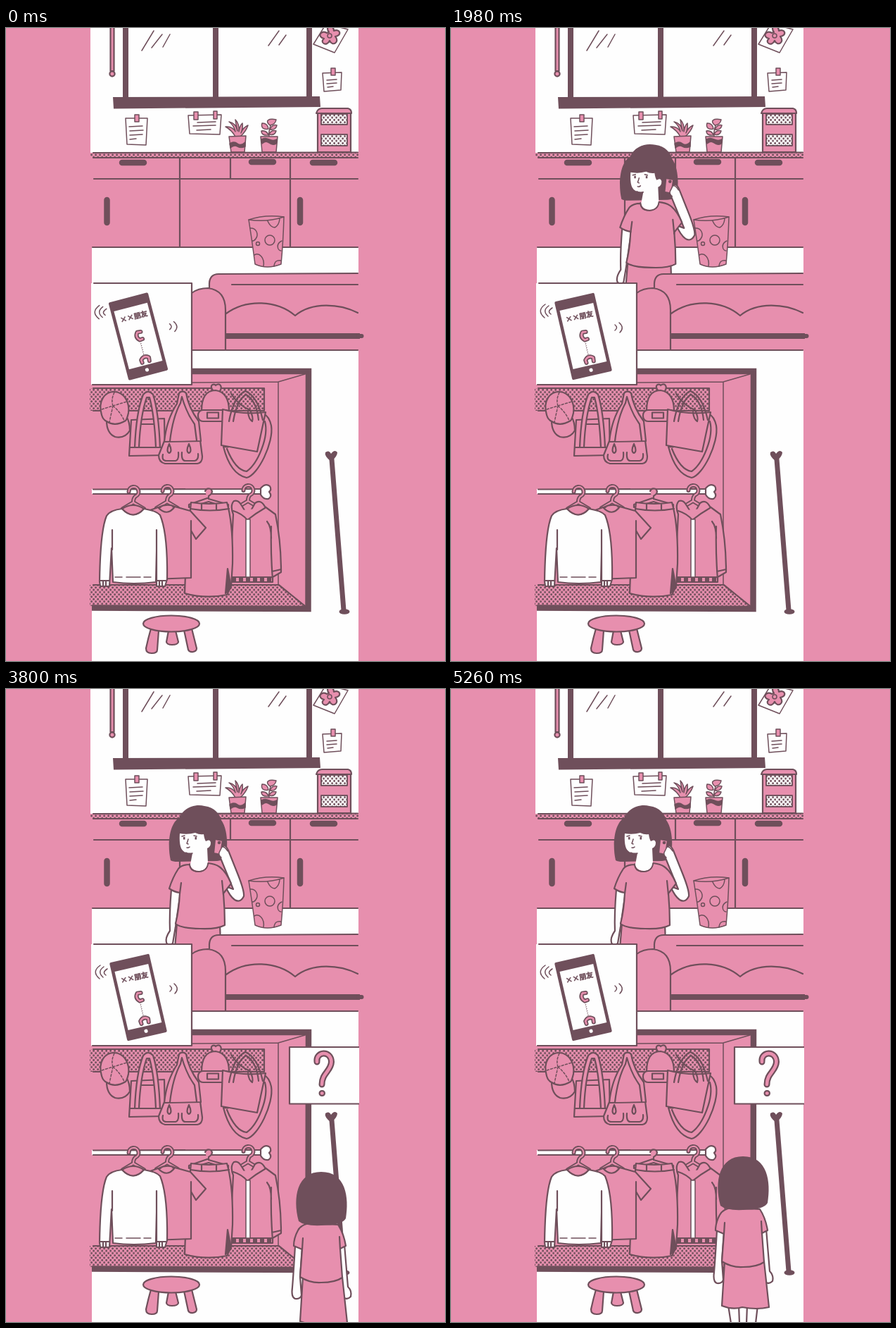
Animation, 624 px wide and 898 px high, one loop 5.36 s. Source, as an HTML page:

```html
<!DOCTYPE html>
<html lang="en">
<head>
<meta charset="utf-8">
<title>Room</title>
<style>
  html, body { margin: 0; height: 100%; overflow: hidden; background: #e78fae; }
  svg { display: block; width: 624px; height: 898px; fill: none; stroke: #6f4f5b; stroke-width: 2.2;
        stroke-linecap: round; stroke-linejoin: round; }
  .p { fill: #e78fae; }
  .w { fill: #fefefe; }
  .d { fill: #6f4f5b; }
  .n { stroke: none; }
  .thin { stroke-width: 1.5; }
  .pink { stroke: #e78fae; }
  text { fill: #6f4f5b; stroke-width: .5; font: bold 10px "Noto Sans CJK SC", "Noto Sans CJK", sans-serif; text-anchor: middle; }
</style>
</head>
<body>
<svg viewBox="0 0 624 898">
  <defs>
    <pattern id="dots" width="6" height="6.6" patternUnits="userSpaceOnUse">
      <g class="d n"><circle cx="1.600" cy="1.700" r="1.500"/><circle cx="4.600" cy="5" r="1.500"/></g>
    </pattern>
    <clipPath id="panel"><rect width="502" height="898"/></clipPath>
    <path id="handset" d="M4-5.500L-1-6Q-6 0 0 5.500L4 5"/>
    <path id="question" d="M442 529C440 514 462 512 462.500 529C462 542 449 545 449 561M449 573.500h.5"/>
    <path id="hook" d="M-6.500-1A7 7 0 1 1 3 5.500Q0 8 0 14L-15 23M0 14L15 23"/>
    <g id="hanger">
      <use href="#hook" stroke-width="6"/>
      <use class="pink" href="#hook" stroke-width="2.200"/>
    </g>
  </defs>

  <rect class="p n" width="624" height="898"/>
  <path class="w n" d="M120 0H501V178H120ZM121 311H501V898H122V311Z"/>

  <!-- window and wall -->
  <path class="d n" d="M166 0h8v98h-8ZM294 0h8v98h-8ZM427 0h8v98h-8ZM152 98L446 97L447 112L153 114.500Z"/>
  <path class="thin" d="M210 4L193 32M222 9L207 28M233 9L223 27M388 4L373 25M398 10L388 24"/>
  <path class="p" d="M148.500-2V61h5V-2"/>
  <circle class="p" cx="151" cy="65" r="3.600"/>
  <path class="w thin" d="M455-6L437 23L467 35L486 2Z"/>
  <path class="p" d="M459 6C452-4 466-6 466 4C475 0 478 11 468 12C475 20 464 27 460 18C456 27 445 21 452 15C442 13 447 2 456 7Z"/>
  <circle class="p thin" cx="460" cy="11" r="3"/>

  <g class="thin">
    <path class="w" d="M450 64L477 63L476 88L452 90Z"/>
    <path d="M456 74L470 73M456 79L470 78M457 84L465 83"/>
    <path class="w" d="M170 128L201 128L199 166L172 165Z"/>
    <path d="M175 140L194 139M176 146L195 145M176 152L194 151M176 158L185 157"/>
    <path class="w" d="M259 124L306 123L304 151L261 150Z"/>
    <path d="M272 134L298 133M266 139L298 138M271 145L291 144"/>
    <path class="p" d="M462 57h6v10h-6ZM183 123h6v10h-6ZM267 119h6v11h-6ZM295 118h5v11h-5Z"/>
  </g>

  <!-- plants and canister -->
  <g class="p thin">
    <path d="M326 154Q321 145 312 140Q322 139 326 147Q324 138 317 133Q327 135 329 146Q327 137 326 130Q332 136 331 147Q332 139 336 135Q337 142 334 149Q337 141 344 138Q341 147 333 154Z"/>
    <path d="M317 154L341 153L339 176H320Z"/>
    <path class="d" d="M318 164Q324 160 329 164T340 162V168Q334 171 329 168T319 170Z"/>
    <path d="M374 154Q373 145 377 136"/>
    <path d="M375 138C367 131 374 128 384 130Q383 137 375 138ZM373 143C366 145 362 141 364 135Q372 135 373 143ZM375 144Q379 136 385 138Q384 145 375 144ZM373 152Q363 153 363 146Q371 145 373 152ZM374 151Q377 144 384 146Q382 153 374 151Z"/>
    <path d="M362 154L386 154L384 176H364Z"/>
    <path class="d" d="M363 158Q368 155 374 158T385 158L384 164Q379 167 374 163T364 164Z"/>
  </g>
  <path class="p" d="M443 121V176H490V121"/>
  <g class="thin">
    <path class="w" d="M448 122H485V137H448ZM448 151H485V167H448Z"/>
    <path fill="url(#dots)" d="M448 122H485V137H448ZM448 151H485V167H448Z"/>
  </g>
  <path class="p" d="M441 121Q443 114 449 114H486Q491 115 491 121Z"/>

  <!-- counter and cabinets -->
  <path class="p n" d="M120 177H501V184H120Z"/>
  <path fill="url(#dots)" stroke="none" d="M120 177H501V184H120Z"/>
  <path d="M124 177L500 176.500M124 184H500M125 214H500M247 184V311M319 184V214M404 184V311M123 311H500"/>
  <path stroke-width="8.500" d="M165 191H196M349 190H380M436 191H467M143.500 244V276M418 244V276"/>

  <!-- basket -->
  <path class="p thin" d="M345 272Q369 264 395 268Q394 304 391 335Q371 343 354 335Q350 303 345 272Z"/>
  <g class="thin">
    <path d="M345 272Q370 276 395 268M347 284C355 283 360 292 355 299Q353 302 350 302M392 302C383 306 386 316 391 316M353 322C360 318 368 326 366 338M381 338Q382 328 391 330M372 274Q376 283 382 283Q388 280 389 271"/>
    <circle cx="375" cy="301" r="7"/><circle cx="358" cy="306" r="2.500"/>
  </g>

  <g id="woman">
    <path class="p" d="M243 332L238 392H306L304 332Z"/>
    <path class="w" d="M235 284Q232 320 233 343Q226 353 228 360Q231 365 237 361L241 337L248 288"/>
    <path class="d n" d="M234 243C229 221 232 191 246 183C253 167 270 163 282 166C297 168 304 178 306 186C315 198 316 225 312 236Q310 243 300 244L244 245Q237 245 234 243Z"/>
    <path class="w" d="M312 280Q318 294 325 299Q333 304 338 294Q339 287 330 264L316 229Q313 222 309 222L303 235L305 240L323 284Z"/>
    <path class="p" d="M261 249Q250 249 245 255Q237 267 232 283Q239 288 247 289Q246 313 241 333Q250 340 276 340Q300 341 311 335Q311 313 309 290L320 276Q313 259 303 252Q297 248 287 247Q286 258 274 259Q262 259 261 249Z"/>
    <path d="M249 275L247 290M307 272Q308 282 309 292"/>
    <path class="w n" d="M247 205Q259 207 269 204Q275 207 281 206Q282 213 284 216Q290 212 291 218Q291 224 286 226L287 247Q285 258 274 258Q263 257 262 249L265 233Q253 234 249 226Q246 219 247 205Z"/>
    <path class="thin" d="M261 248Q262 259 274 259Q286 258 287 247M259 213Q258 217 257 219L259 220M257 225Q259 226 261 224M265 233Q259 234 256 232M250 209L254 208M267 208L271 209"/>
    <path class="d n" d="M252 210h2.500v3.500h-2.500ZM268.500 210h2.500v3.500h-2.500Z"/>
    <path class="p" d="M297 213L308 215L305 235L295 233Z"/>
    <circle class="d n" cx="303" cy="218" r="2.300"/>
    <path class="w thin" d="M315 230Q311 223 307 224L303 232Q302 236 306 239"/>
  </g>

  <!-- sofa -->
  <path class="p n" d="M264 457V376Q270 369 288 369V360Q290 349 302 349H502V457Z"/>
  <path d="M289 368V362Q290 349 302 349L500 348M321 364H500M264 376Q273 369 287 369Q312 372 312 400V457M313 405C342 384 385 386 411 408C435 388 474 391 500 404M264 457H500"/>
  <path stroke-width="8" stroke-linecap="butt" d="M313 437H503"/>
  <path stroke-width="6" d="M501 437H505.500"/>

  <!-- wardrobe -->
  <path class="p n" d="M120 488H430V823H120Z"/>
  <path stroke-width="8.500" stroke-linejoin="miter" stroke-linecap="butt" d="M260 487H430L429.500 824L122 822.500"/>
  <path class="thin" d="M264 503L387 502V790L424 819M387 502L425 491"/>
  <path fill="url(#dots)" stroke="none" d="M119 511H367V543H119ZM119 790H388L425 820H119Z"/>
  <path d="M124 511H367V543H124M124 790H388L425 820"/>

  <!-- phone card -->
  <path class="w n" d="M121 362H264V506H121Z"/>
  <path d="M125 362H264V506H123"/>
  <g id="phone">
    <path class="thin" d="M134 392Q121 401 133 411M139 394Q129 401 138 409M144 397Q136 402 142 406M233 421Q238 425 233 429M239 418Q247 425 240 432"/>
    <g transform="translate(188 437.500) rotate(-13)">
      <rect class="d n" x="-29" y="-57" width="58" height="114" rx="2"/>
      <rect class="w n" x="-24.500" y="-43" width="49" height="85"/>
      <circle class="w n" cy="49" r="2.600"/>
      <text x="1" y="-25">××朋友</text>
      <path class="thin" stroke-dasharray="0 3" d="M1 11V28"/>
      <g transform="translate(1)"><use href="#handset" stroke-width="6"/><use class="pink" href="#handset" stroke-width="2.600"/></g>
      <g transform="translate(1 33.500) rotate(90)"><use href="#handset" stroke-width="6"/><use class="pink" href="#handset" stroke-width="2.600"/></g>
    </g>
  </g>

  <!-- hats and bags -->
  <g class="p">
    <path d="M143 557Q143 575 155 580Q169 583 176 571Q176 559 171 551Z"/>
    <path d="M136 549C130 528 141 516 154 516C169 517 176 532 174 546Q172 555 170 557Q155 566 143 558Q138 556 136 549Z"/>
    <path class="thin" stroke-dasharray="3 2.500" d="M154 517Q149 527 152 536L136 541M152 536L172 530M152 536L147 559M152 536Q163 545 168 557"/>

    <path d="M178 556L225 554L226 606L175 607Z"/>
    <path d="M176 595H226M189 562H212"/>
    <path d="M183 595Q185 545 195 520Q202 512 209 520Q217 545 219 595H213Q211 550 204 524H200Q191 550 189 595Z"/>
    <path d="M225 586L217 606Q217 616 226 618H272Q279 617 279 608L276 585Z"/>
    <path d="M225 587Q228 556 243 533L246 518Q251 513 256 518Q259 538 274 558L277 586Z"/>
    <path d="M233 586Q237 552 248 532L250 523Q256 545 268 562L271 585M223 605Q221 614 228 614H241Q246 613 245 602M250 602Q249 614 255 614H268Q274 613 273 604"/>
    <path d="M232 590Q227 601 232 603Q237 601 232 590ZM260 590Q255 601 260 603Q265 601 260 590Z"/>

    <path d="M294 514C288 506 296 504 298 507C304 502 308 509 304 515"/>
    <path d="M278 543Q278 514 298 514Q317 517 317 543Z"/>
    <rect x="273" y="542" width="46" height="16" rx="7"/>
    <rect x="286" y="545.500" width="16" height="8"/>

    <path d="M309 594Q319 633 342 638C358 635 381 588 377 564Q374 551 367 548L356 598Z"/>
    <path d="M314 597Q326 627 342 629C358 618 374 580 368 558"/>
    <path d="M308 541Q337 549 369 545L357 601L306 592Z"/>
    <path fill="none" d="M317 558Q323 524 340 515Q357 521 365 556M323 558Q328 528 341 520Q356 528 359 556M320 519Q331 536 347 542Q352 553 350 558Q345 555 344 545"/>
  </g>

  <!-- clothes rail -->
  <path class="w n" d="M122 654H363V661H122Z"/>
  <path d="M124 654.500L363 654M124 661H363"/>
  <path class="w" d="M362 653Q369 645 375 650Q378 655 374 658Q379 664 373 668Q366 669 362 662Z"/>
  <use href="#hanger" x="181" y="659"/>
  <use href="#hanger" x="229" y="658"/>
  <use href="#hanger" x="344" y="657"/>
  <path class="p" d="M283 657Q285 652 291 654Q296 659 288 664V668L316 676V681L288 672L260 680V676L286 667"/>

  <g class="p">
    <path d="M323 690Q318 677 324 671Q330 669 334 676L344 692L354 674Q362 668 368 679L383 690Q391 728 391 772L379 779V786H318Z"/>
    <path d="M323 685Q336 689 343 698Q354 689 368 681M377 707Q376 744 379 782M371 700Q377 707 377 724M378 771L391 768M320 779H379"/>
    <path class="w thin" d="M341 697H347V779H341Z"/>
    <path stroke-width="6" stroke-dasharray="6 4" stroke-linecap="butt" d="M321 783H378"/>
    <path d="M263 673Q289 677 314 673Q323 704 322 760L320 792L314 804Q284 810 254 802Q256 739 263 673Z"/>
    <path d="M262 682Q290 687 317 682M278 675V683M299 676V684"/>
    <path class="d" d="M315 767L312 802L320 794Z"/>
    <path d="M205 684L216 680Q229 694 240 679L262 685L284 709L270 725L263 713V780L210 782Z"/>
    <path d="M263 699V713M217 680Q229 674 240 679"/>
  </g>
  <path class="w" d="M165 682Q148 684 143 692Q134 713 133 785L134 792H147L150 738L152 786Q181 790 213 786L214 742V784V792H226L229 782Q230 717 219 691Q214 685 196 682Q181 699 165 682Z"/>
  <path class="p" d="M165 682Q181 672 196 682Q181 699 165 682Z"/>
  <path d="M151 712V740M214 712V742M134 784H147M214 784H227M138 785V791M142 785V791M218 785V791M222 785V791"/>
  <path class="thin" stroke-dasharray="10 6 20 5" d="M155 779H210"/>

  <!-- stick and stool -->
  <path stroke-width="7" d="M463 612L480 826"/>
  <path class="d n" d="M462 615Q452 607 454 602Q459 598 462 604Q467 597 471 602Q471 608 462 615Z"/>
  <ellipse class="d n" cx="481" cy="828" rx="7.500" ry="3.800"/>
  <g class="p">
    <path d="M206 852Q202 866 199 880Q199 887 207 887Q215 887 215 882L217 855ZM231 855L228 871Q229 875 236 875Q244 875 245 871L241 855ZM253 854L259 882Q261 886 266 885Q271 884 271 880L264 852Z"/>
    <ellipse cx="235" cy="845" rx="40" ry="11.500"/>
  </g>

  <g clip-path="url(#panel)">
    <g id="card">
      <path class="w" d="M520 508H403V588.500H520"/>
      <use href="#question" stroke-width="9"/>
      <use class="pink" href="#question" stroke-width="4.600"/>
    </g>
  </g>

  <g id="girl">
    <path class="w" d="M394 874L398 900H410L409 874ZM421 874L420 900H433L436 874Z"/>
    <path class="w" d="M378 768Q376 802 374 827Q372 841 378 843Q385 844 387 838L385 812L388 768ZM448 766L453 826Q459 832 457 840Q451 846 445 840L440 768Z"/>
    <path class="p" d="M389 812L385 875Q400 881 414 877Q435 881 452 877L445 812Z"/>
    <path class="p" d="M399 736Q386 738 382 746Q376 757 376 768L388 773L385 812Q399 821 415 820Q435 820 445 813L442 772L450 768Q447 750 439 738Z"/>
    <path d="M389 757L388 773M441 755L442 773"/>
    <path class="d n" d="M383 733C374 699 381 663 415 663C450 663 455 699 450 729Q445 739 415 739Q391 740 383 733Z"/>
  </g>
</svg>
<script>
  const LOOP = 5360, STEP = 121.4, MOVE_STEPS = 7.2;
  const [phone, woman, card, girl] = ['phone', 'woman', 'card', 'girl'].map(id => document.getElementById(id));

  // Share of the way still to go for a part that enters at the given step
  const remaining = (step, start) => Math.max(0, 1 - Math.max(0, step - start) / MOVE_STEPS);

  function slideIn(part, step, start, dx, dy) {
    const r = remaining(step, start);
    part.setAttribute('visibility', step < start ? 'hidden' : 'visible');
    part.setAttribute('transform', `translate(${dx * r} ${dy * r})`);
  }

  function draw(now) {
    const step = Math.max(0, 1 + Math.floor((now % LOOP - 150) / STEP));
    phone.setAttribute('transform', `rotate(${-1.7 * remaining(step, 1)} 188 437)`);
    slideIn(woman, step, 11, 27.2, -0.5);
    slideIn(card, step, 21, 80, 0);
    slideIn(girl, step, 31, 33, 22);
    requestAnimationFrame(draw);
  }
  draw(0);
</script>
</body>
</html>
```
